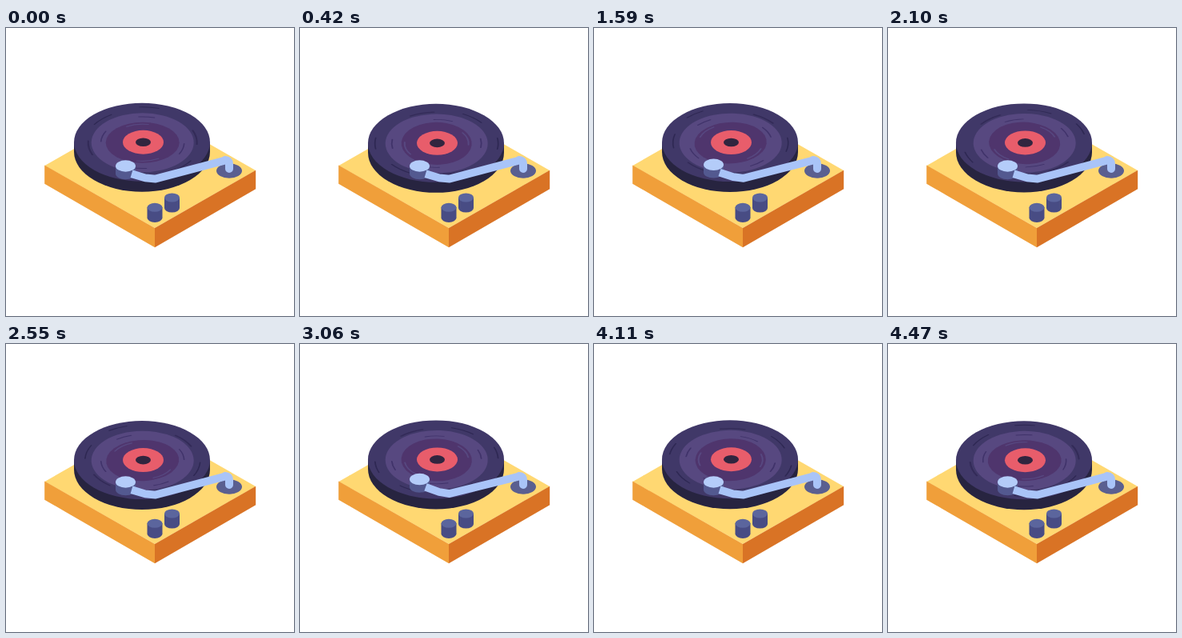
Recreate the animation shown at these times as an HTML page. Size 360x360 px, loop 4.5 s.

```html
<!DOCTYPE html>
<html lang="en">
<head>
<meta charset="utf-8">
<title>Turntable</title>
<style>
html, body { margin: 0; width: 100%; height: 100%; overflow: hidden; background: #fff; }
svg { display: block; width: 100vw; height: 100vh; }
</style>
</head>
<body>
<svg viewBox="0 0 360 360">
  <path fill="#ffd872" d="M48.5 172L175 99.7L312 178L186 250Z"/>
  <path fill="#f09f3a" d="M48.2 171.5L186 250V274.2L48.2 194.7Z"/>
  <path fill="#d97325" d="M186 250L312.2 177.8V201.2L186 274.2Z"/>

  <g id="record">
    <path fill="#272440" d="M85 143V155A85 50 0 0 0 255 155V143Z"/>
    <ellipse cx="170" cy="143" rx="85" ry="49" fill="#403868"/>
    <g transform="translate(170.7 143.5) scale(1 .577)">
      <g id="spin" fill="none" stroke-linecap="round">
        <circle r="64" fill="#574880"/>
        <ellipse rx="46" ry="44" fill="#4f356d"/>
      </g>
    </g>
    <ellipse cx="171.5" cy="143" rx="25.5" ry="15" fill="#e85d6b"/>
    <ellipse cx="171.5" cy="143" rx="9.5" ry="5.3" fill="#31253f"/>
  </g>

  <ellipse cx="279" cy="178.5" rx="16" ry="9.2" fill="#5a5f90"/>
  <path id="headBody" fill="#535990"/>
  <path id="arm" fill="none" stroke="#a9c4f8" stroke-width="9.8" stroke-linejoin="round"/>
  <path d="M274 165Q279 165 279 170V176" fill="none" stroke="#a9c4f8" stroke-width="10" stroke-linecap="round"/>
  <ellipse id="headTop" cx="149.5" rx="12.5" ry="7.2" fill="#b4ccf9"/>
  <g id="knobs"></g>
</svg>
<script>
const LOOP = 4500, TURN = 1800;
const get = id => document.getElementById(id);

function add(parent, tag, attrs) {
  const el = document.createElementNS("http://www.w3.org/2000/svg", tag);
  for (const key in attrs) el.setAttribute(key, attrs[key]);
  parent.append(el);
}

function groove(radius, middle, span, color, width) {
  const point = deg => {
    const a = deg * Math.PI / 180;
    return `${radius * Math.cos(a)} ${radius * Math.sin(a)}`;
  };
  const d = `M${point(middle - span / 2)}A${radius} ${radius} 0 0 1 ${point(middle + span / 2)}`;
  add(get("spin"), "path", { d, stroke: color, "stroke-width": width });
}

for (const half of [0, 180]) {
  groove(77, half - 84, 18, "#2e2853", 1.7);
  groove(72, half - 135, 24, "#2e2853", 1.6);
  groove(68, half - 10, 26, "#332b58", 2.2);
  groove(56, half - 85, 20, "#40336a", 1.8);
  groove(52, half + 15, 26, "#40336a", 1.6);
  groove(40, half - 100, 40, "#574880", 2);
}

for (const [x, y] of [[207.5, 212], [186, 224.3]]) {
  add(get("knobs"), "path", { fill: "#484c84", d: `M${x - 9.5} ${y}v13a9.5 5.6 0 0 0 19 0v-13Z` });
  add(get("knobs"), "ellipse", { cx: x, cy: y, rx: 9.5, ry: 5.5, fill: "#5b659d" });
}

function draw(now) {
  const t = now % LOOP;
  const phase = t / TURN * 2 * Math.PI;
  get("record").setAttribute("transform", `translate(0 ${1 - 1.25 * Math.cos(phase)})`);
  get("spin").setAttribute("transform", `rotate(${t / TURN * 360})`);

  // The needle hops up during the second half of each turn.
  const hop = 3.8 * Math.max(0, -Math.sin(phase)) ** 2;
  const y = 172.5 - hop;
  get("headTop").setAttribute("cy", y);
  get("headBody").setAttribute("d", `M137 ${y}v9.6a12.5 7.2 0 0 0 25 0v-9.6Z`);
  get("arm").setAttribute("d", `M157 ${y + 9.8}L174 ${187.4 - hop * .7}L187 ${188.6 - hop * .45}L276 165`);
}

function frame(now) {
  draw(now);
  requestAnimationFrame(frame);
}
draw(0);
requestAnimationFrame(frame);
</script>
</body>
</html>
```
